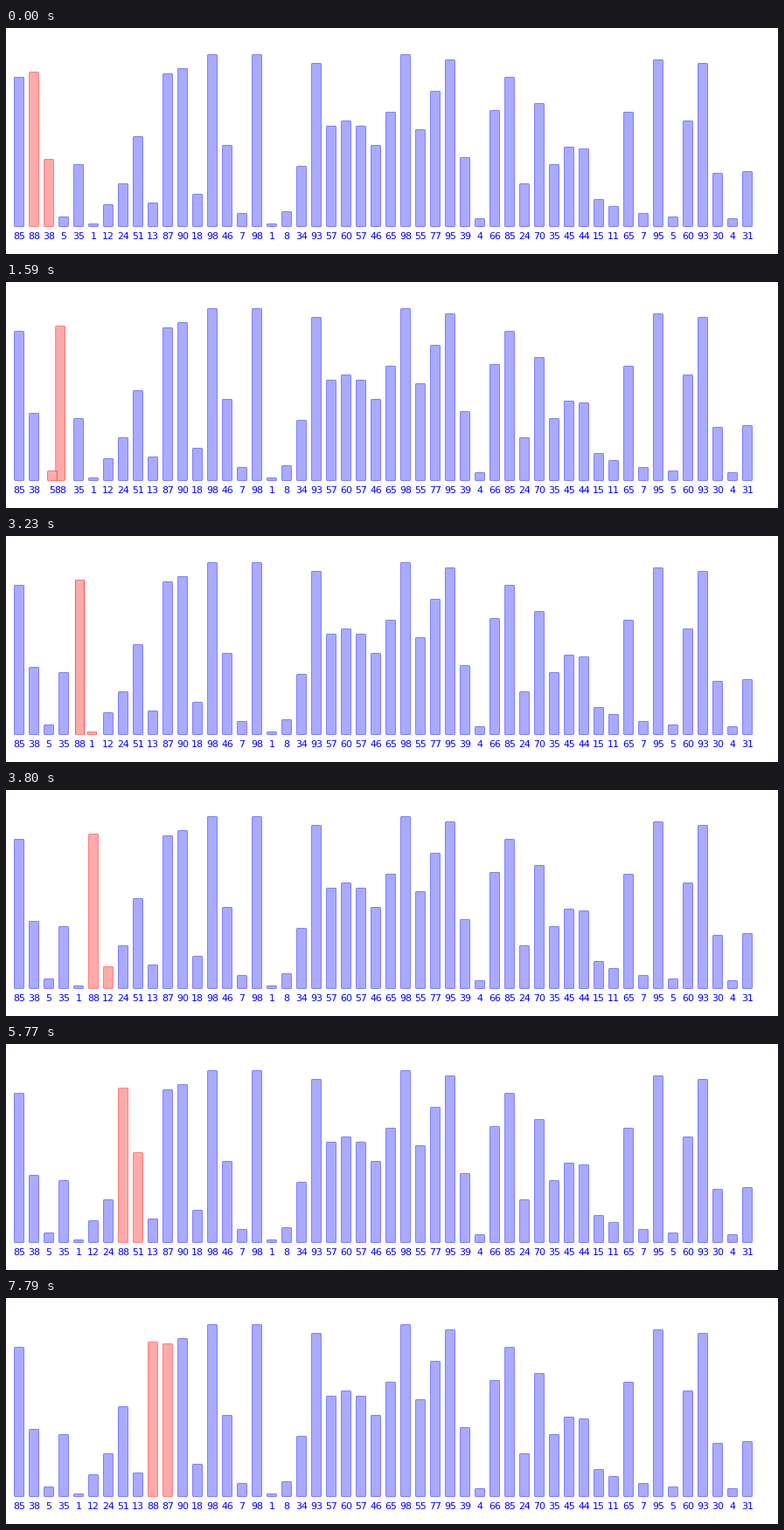
Recreate the animation shown at these times as a matplotlib script. Size 883 by 259 pixels, loop 8 s.

```python
import matplotlib.pyplot as plt
import numpy as np
from matplotlib.animation import FuncAnimation
from matplotlib.collections import PolyCollection

W, H, DPI = 883, 259, 64
PX = 72 / DPI  # one pixel in points
LOOP, STEP = 8000, 20

VALUES = [85, 88, 38, 5, 35, 1, 12, 24, 51, 13, 87, 90, 18, 98, 46, 7, 98,
          1, 8, 34, 93, 57, 60, 57, 46, 65, 98, 55, 77, 95, 39, 4, 66, 85,
          24, 70, 35, 45, 44, 15, 11, 65, 7, 95, 5, 60, 93, 30, 4, 31]
N = len(VALUES)
X0, PITCH, BAR_W, BASE = 15, 17, 10, 227
TEXT_Y = 242

FIRST = 1  # position of the bar that bubbles to the right
START, PERIOD = 181, 1000  # first swap, time between swaps
SWAP_MS, PAUSE_MS = 440, 35
TICK, TICK_0 = 141.6, -38  # the display refreshes in coarse ticks

BLUE, RED = ("#0000ff", "#aaaaff"), ("#ff0000", "#ffaaaa")


def state(t):
    """Bar centres and the two highlighted bars at time t."""
    done = int((t - START - SWAP_MS - PAUSE_MS) // PERIOD) + 1
    p = np.clip((t - START - done * PERIOD) / SWAP_MS, 0, 1)
    other = FIRST + 1 + done
    slots = np.arange(N, dtype=float)
    slots[FIRST] += done + p
    slots[FIRST + 1:other] -= 1
    slots[other] -= p
    return X0 + PITCH * slots, (FIRST, other)


def box(x, value, grow=0):
    l, r = x - BAR_W / 2 - grow, x + BAR_W / 2 + grow
    top, bottom = BASE - 2 * value - grow, BASE + grow
    return [(l, top), (r, top), (r, bottom), (l, bottom)]


fig = plt.figure(figsize=(W / DPI, H / DPI), dpi=DPI, facecolor="white")
ax = fig.add_axes([0, 0, 1, 1])
ax.set_xlim(0, W)
ax.set_ylim(H, 0)
ax.axis("off")

# Each bar is a box in the edge colour under a slightly smaller fill.
bars = PolyCollection([box(0, 1)] * (2 * N), linewidths=0, edgecolors="none")
bars.set_snap(False)
ax.add_collection(bars, autolim=False)
labels = [ax.text(X0 + PITCH * i, TEXT_Y, str(v), color=BLUE[0],
                  family="DejaVu Sans", size=11 * PX,
                  ha="center", va="baseline")
          for i, v in enumerate(VALUES)]


def draw(frame):
    now = frame * STEP + STEP / 2
    xs, hot = state((now - TICK_0) // TICK * TICK + TICK_0)
    polys, colors = [], []
    for i, (x, v) in enumerate(zip(xs, VALUES)):
        polys += [box(x, v, 0.5), box(x, v)]
        colors += RED if i in hot else BLUE
        labels[i].set_x(x)
    bars.set_verts(polys)
    bars.set_facecolor(colors)
    return [bars, *labels]


anim = FuncAnimation(fig, draw, frames=LOOP // STEP, interval=STEP,
                     init_func=lambda: draw(0), repeat=True, repeat_delay=0)
plt.show()
```
